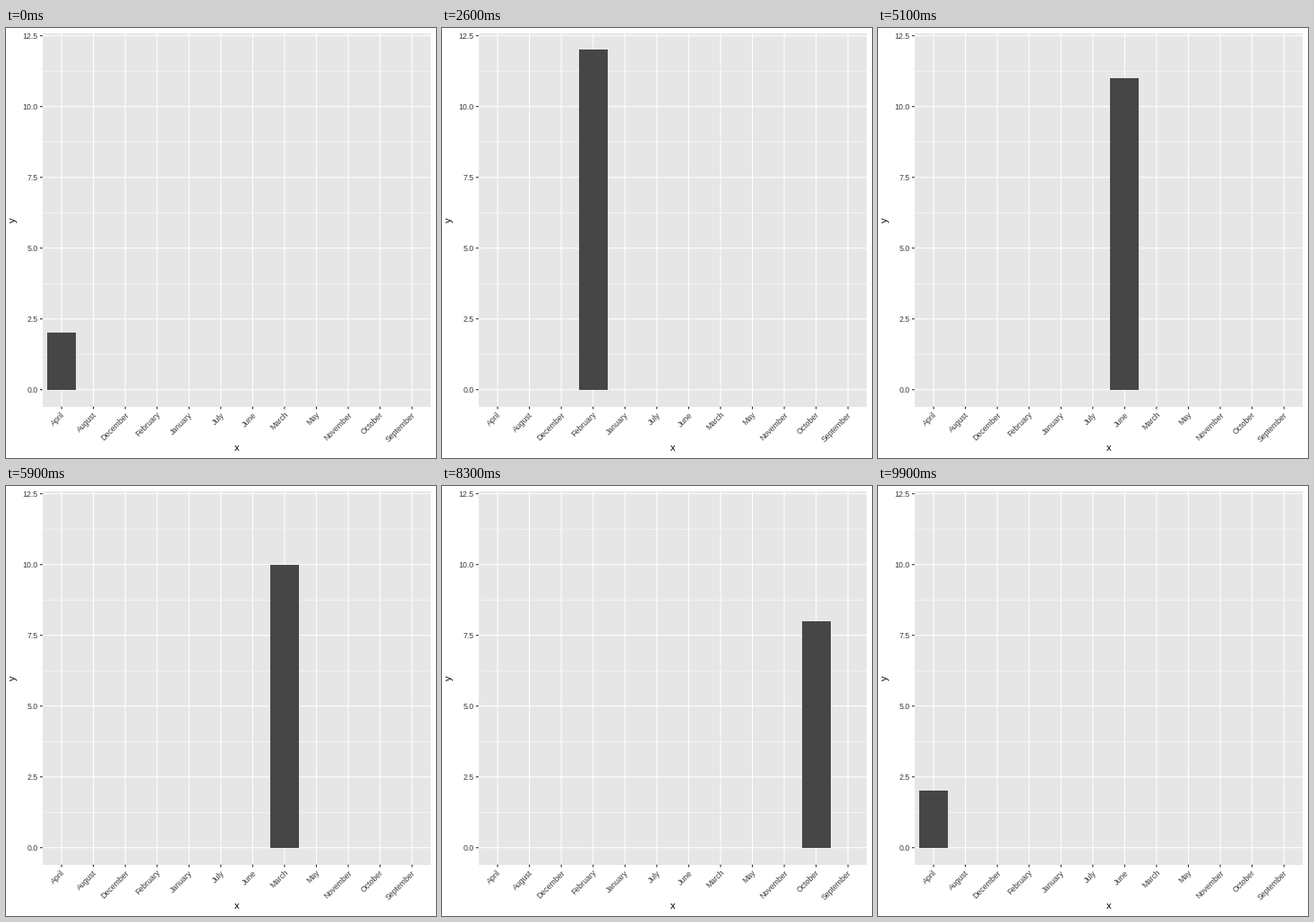
These frames come from a looping animation (480x480 px, 10 s). A matplotlib script:

```python
import matplotlib.pyplot as plt
from matplotlib.animation import FuncAnimation
from matplotlib.patches import Rectangle

SIZE, DPI = 480, 100
PT = 72 / DPI  # points per pixel
FRAMES, INTERVAL = 100, 100

# panel edges and scales, in pixels from the top left
LEFT, RIGHT, TOP, BOTTOM = 40.7, 474.5, 5.5, 422.7
STEP = (RIGHT - LEFT) / 12.2
UNIT = (BOTTOM - TOP) / 13.2
ZERO = BOTTOM - 0.6 * UNIT

VALUES = {
    "April": 2, "August": 4, "December": 7, "February": 12,
    "January": 3, "July": 5, "June": 11, "March": 10,
    "May": 6, "November": 1, "October": 8, "September": 9,
}
MONTHS = list(VALUES)
CHANGES = [800, 1700, 2600, 3500, 4400, 5100, 5900, 6700, 7500, 8300, 9100, 9900]

PANEL, BAR = "#e6e6e6", "#464646"
TICK, LABEL = "#242424", "#3b3b3b"

plt.rcParams["font.family"] = "Liberation Sans"
fig = plt.figure(figsize=(SIZE / DPI, SIZE / DPI), dpi=DPI, facecolor="white")
ax = fig.add_axes([0, 0, 1, 1])
ax.set_xlim(0, SIZE)
ax.set_ylim(SIZE, 0)
ax.axis("off")


def x_at(i):
    return LEFT + (i + 0.6) * STEP


def y_at(value):
    return ZERO - value * UNIT


def line(x0, y0, x1, y1, color="white", width=1.07, z=2):
    ax.plot([x0, x1], [y0, y1], color=color, lw=width * PT, zorder=z,
            solid_capstyle="butt", snap=False)


def label(x, y, text, size=8.8, color=LABEL, ha="right", angle=0):
    ax.text(x, y, text, fontsize=size * PT, color=color, ha=ha, va="baseline",
            rotation=angle, rotation_mode="anchor")


def place(rect, x0, y0, x1, y1):
    x0, y0, x1, y1 = (int(v + 0.5) for v in (x0, y0, x1, y1))
    rect.set_bounds(x0, y0, x1 - x0, y1 - y0)


panel = Rectangle((0, 0), 1, 1, fc=PANEL, lw=0, zorder=0)
bar = Rectangle((0, 0), 1, 1, fc=BAR, lw=0, zorder=3)
ax.add_patch(panel)
ax.add_patch(bar)
place(panel, LEFT, TOP, RIGHT - 0.1, BOTTOM)

for k in range(5):
    y = y_at(1.25 + 2.5 * k)
    line(LEFT, y, RIGHT, y, width=0.53, z=1)

for k in range(6):
    y = y_at(2.5 * k)
    line(LEFT, y, RIGHT, y)
    line(LEFT - 2.75, y, LEFT, y, TICK)
    label(LEFT - 4.95, y + 3.15, f"{2.5 * k:.1f}")

for i, month in enumerate(MONTHS):
    x = x_at(i)
    line(x, TOP, x, BOTTOM)
    line(x, BOTTOM, x, BOTTOM + 2.75, TICK)
    label(x + 4.5, BOTTOM + 9.4, month, angle=45)

label((LEFT + RIGHT) / 2, 472.2, "x", 11, "black", "center")
label(11.2, (TOP + BOTTOM) / 2, "y", 11, "black", "center", 90)


def update(frame):
    now = frame * INTERVAL
    i = sum(now >= t for t in CHANGES) % len(MONTHS)
    x = x_at(i)
    half = 0.45 * STEP
    place(bar, x - half, y_at(VALUES[MONTHS[i]]) - 0.05, x + half, ZERO)
    return (bar,)


anim = FuncAnimation(fig, update, frames=FRAMES, interval=INTERVAL,
                     repeat=True, repeat_delay=0, blit=False)
plt.show()
```
